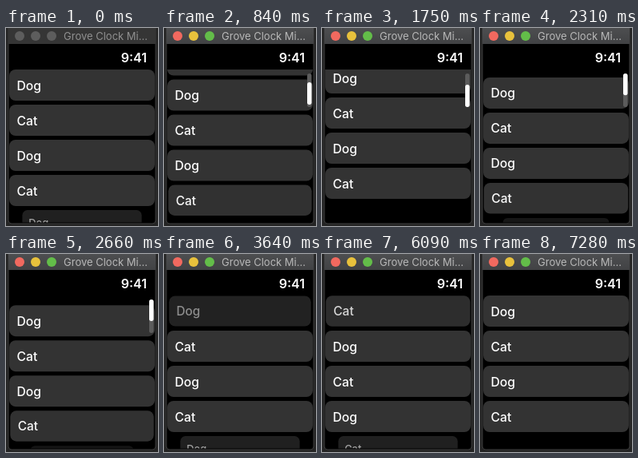
Animation of 190 by 248 pixels, one loop 8.19 s. Source, as an HTML page:

```html
<!DOCTYPE html>
<html lang="en">
<head>
<meta charset="utf-8">
<title>Swipe list</title>
<style>
  html, body { margin: 0; width: 100%; height: 100%; overflow: hidden; background: #242424; }
  svg { display: block; font-family: Inter, Roboto, sans-serif; }
</style>
</head>
<body>
<svg width="190" height="248" viewBox="0 0 190 248">
  <clipPath id="screen"><rect x="4" y="52" width="182" height="191.5"/></clipPath>
  <linearGradient id="metal" x2="0" y2="1">
    <stop stop-color="#4d4e50"/>
    <stop offset="1" stop-color="#414244"/>
  </linearGradient>
  <path d="M3 0H187V241Q187 245 183 245H7Q3 245 3 241Z" fill="#000" stroke="#3c3c3c"/>
  <rect id="head" x="3" width="184" height="20"/>
  <g id="lights">
    <circle cx="17" cy="10" r="6"/>
    <circle cx="37" cy="10" r="6"/>
    <circle cx="57" cy="10" r="6"/>
  </g>
  <text id="title" x="72" y="15" font-size="13">Grove Clock Mi...</text>
  <text x="176" y="43.3" font-size="16" font-weight="600" fill="#fff" text-anchor="end">9:41</text>
  <g id="list" clip-path="url(#screen)"></g>
  <g id="bar">
    <rect x="179" y="57" width="5.5" height="42" rx="2.75" fill="#5c5c5c"/>
    <rect id="thumb" x="179" width="5.5" rx="2.75" fill="#fff"/>
  </g>
</svg>
<script>
const LOOP = 8190, STEP = 70, TOP = 52, PITCH = 44, END = 97;
const HOVER = 70, FOCUS = 630;
const $ = id => document.getElementById(id);
const clamp = (v, lo = 0, hi = 1) => Math.min(hi, Math.max(lo, v));

// Eased value through [time, value] pairs
function track(t, keys) {
  if (t <= keys[0][0]) return keys[0][1];
  for (let i = 1; i < keys.length; i++) {
    const [a, from] = keys[i - 1], [b, to] = keys[i];
    if (t <= b) {
      const p = (t - a) / (b - a);
      return from + (to - from) * p * p * (3 - 2 * p);
    }
  }
  return keys[keys.length - 1][1];
}

// Flick past the limit by 21.5, then a critically damped spring back
function flick(ms) {
  const REACH = 560, SETTLED = 1190, OVER = 21.5;
  if (ms <= 0) return 0;
  if (ms < REACH) return (END + OVER) * Math.sin(ms / REACH * Math.PI / 2) ** 1.3;
  if (ms >= SETTLED) return END;
  const z = (ms - REACH) * .007;
  return END + OVER * (1 + z) * Math.exp(-z);
}

const PRESS = [
  [[3430, 0], [3640, 1], [3710, 1], [4200, 0]],
  [[6020, 0], [6200, 1], [6580, 0]]
];
const REMOVED = [[4970, 0], [5320, 1], [7000, 1], [7280, 2]];
const BAR = [[560, 0], [700, 1], [3290, 1], [3500, 0]];
const LIGHTS = ['#f1695f', '#e8c13c', '#63bd49'];

function add(parent, tag, attrs) {
  const el = document.createElementNS('http://www.w3.org/2000/svg', tag);
  set(el, attrs);
  return parent.appendChild(el);
}
function set(el, attrs) {
  for (const k in attrs) el.setAttribute(k, attrs[k]);
}

const rows = Array.from({ length: 6 }, (_, i) => {
  const g = add($('list'), 'g', {});
  add(g, 'rect', { x: -91, width: 182, height: 39, rx: 8, fill: '#333' });
  const label = add(g, 'text', { x: -81.5, y: 25.5, 'font-size': 15.7, 'font-weight': 500, fill: '#fff' });
  label.textContent = i % 2 ? 'Cat' : 'Dog';
  return { g, label };
});

function draw(t) {
  const scroll = flick(t - 560) - flick(t - 1890);
  const removed = track(t, REMOVED);

  rows.forEach(({ g, label }, i) => {
    const y = TOP + PITCH * Math.max(0, i - removed) - scroll;
    // Rows shrink and dim as they leave through the bottom edge
    const sink = (Math.max(0, y - 184) / PITCH) ** 2;
    const press = PRESS[i] ? track(t, PRESS[i]) : 0;
    const shrink = 1 - .025 * press;
    const scale = Math.max(.1, 1 - .18 * sink) * shrink;
    const top = y + 19.5 * (1 - shrink);
    set(g, {
      transform: `translate(95 ${top}) scale(${scale})`,
      opacity: clamp(1 - .36 * sink) * (1 - .32 * press) * clamp(1 - removed + i)
    });
    set(label, { opacity: 1 - .22 * press });
  });

  const over = Math.max(0, scroll - END, -scroll) / 12;
  const height = 28 - over;
  set($('thumb'), { y: 57 + (42 - height) * clamp(scroll / END), height });
  set($('bar'), { opacity: track(t, BAR) });

  const focused = t >= FOCUS;
  set($('head'), { fill: focused ? 'url(#metal)' : '#353535' });
  set($('title'), { fill: focused ? '#b8b8b8' : '#909090' });
  [...$('lights').children].forEach((dot, i) =>
    set(dot, { fill: t < HOVER ? '#5d5d5d' : LIGHTS[i] }));
}

const start = performance.now();
function frame() {
  const t = (performance.now() - start) % LOOP;
  draw(Math.floor(t / STEP) * STEP);
  requestAnimationFrame(frame);
}
frame();
</script>
</body>
</html>
```
